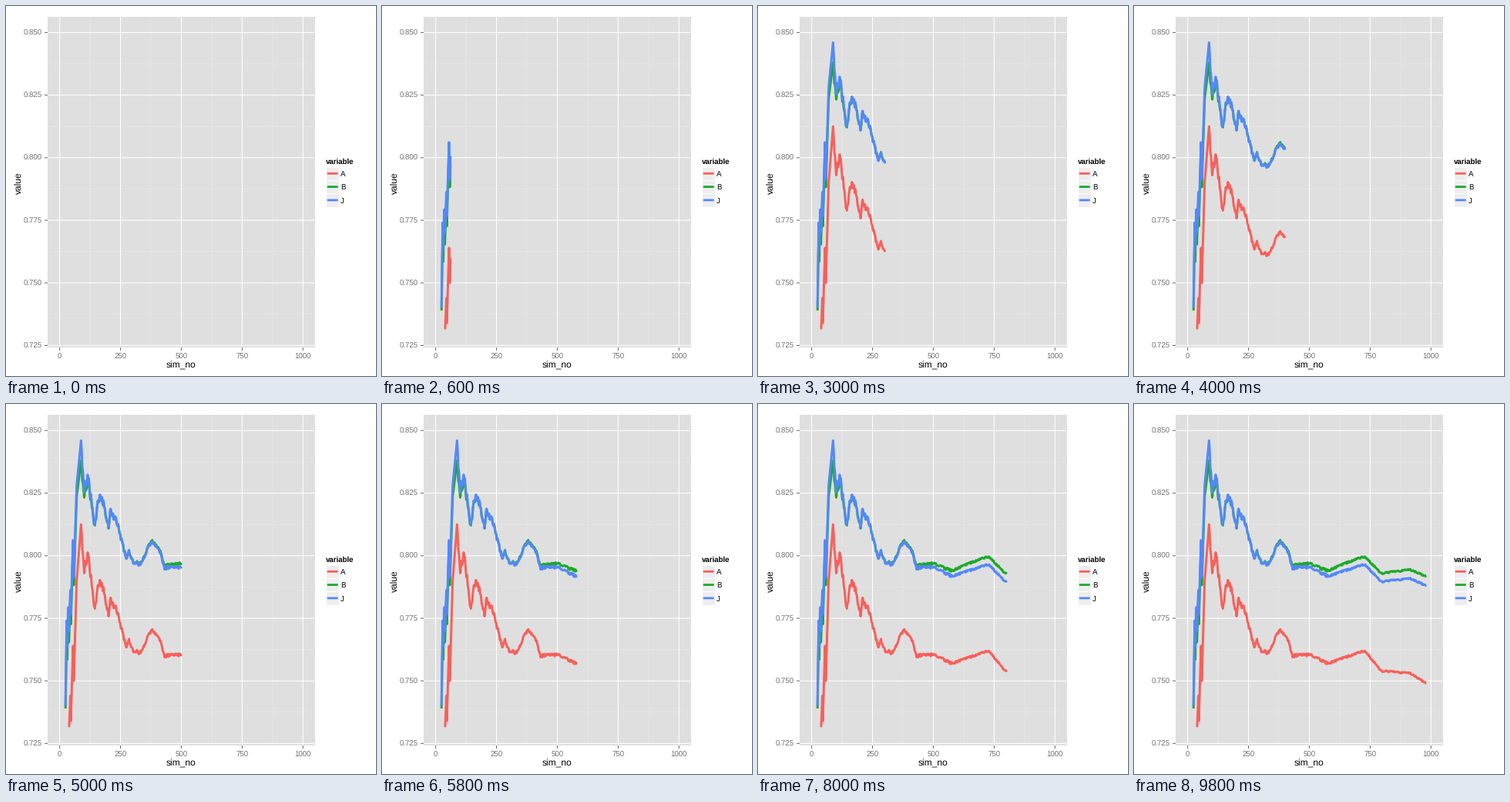
Recreate the animation shown at these times as a matplotlib script. Size 480 px wide and 480 px high, loop 10000 ms.

```python
import numpy as np
import matplotlib.pyplot as plt
from matplotlib.animation import FuncAnimation
from matplotlib.patches import Rectangle

SIZE, DPI = 480, 72
FRAMES, INTERVAL, STEP = 50, 200, 20
LEFT, TOP, RIGHT, BOTTOM = 54, 14, 401, 443

RED, GREEN, BLUE = "#f8605c", "#1caa2c", "#5388fb"
PANEL_GREY, MINOR, KEY, TICK = "#dfdfdf", "#ebebeb", "#eeeeee", "#707070"

plt.rcParams["font.family"] = "Liberation Sans"
plt.rcParams["text.hinting"] = "no_hinting"

# Key points as (sim_no, thousandths): main turns of A, lead of J over A, of B over J
TURNS = [
    (24, 702), (29, 735), (31, 724), (35, 739), (38, 729), (44, 744),
    (46, 734), (55, 764), (58, 750), (70, 790), (88, 812.5), (101, 793),
    (115, 801), (145, 778), (157, 789), (176, 788), (201, 776), (209, 782),
    (236, 778), (274, 763.5), (285, 766.5), (306, 761.5), (335, 761.5),
    (376, 770.5), (410, 767), (430, 760), (500, 760.5), (575, 757),
    (728, 762), (795, 754), (915, 753), (981, 749),
]
J_LEAD = [(24, 38), (50, 43.5), (88, 33.5), (115, 31), (145, 33.5),
          (210, 35.5), (730, 34.5), (981, 39)]
B_LEAD = [(24, -1), (31, -5), (61, -3), (88, -8), (101, -2), (145, -0.3),
          (400, 0.5), (660, 3), (981, 3.7)]


def curve(points, n):
    xs, ys = zip(*points)
    return np.interp(n, xs, ys) / 1000


def px(n):
    return 69.6 + 0.3157 * np.asarray(n)


def py(v):
    return 34.4 + (0.85 - np.asarray(v)) * 3248


# The jitter of a running mean shrinks as 1 / n
sims = np.arange(24, 982)
rng = np.random.default_rng(4)
knots = np.arange(24, 990, 3)
jitter = np.interp(sims, knots, rng.uniform(-1, 1, knots.size))
jitter *= np.where(sims > 90, 0.3 / sims, 0)

a = curve(TURNS, sims) + jitter
j = a + curve(J_LEAD, sims)
b = j + curve(B_LEAD, sims)

fig = plt.figure(figsize=(SIZE / DPI, SIZE / DPI), dpi=DPI, facecolor="white")
ax = fig.add_axes([0, 0, 1, 1])
ax.set_xlim(0, SIZE)
ax.set_ylim(SIZE, 0)
ax.axis("off")


def box(x, y, w, h, color, edge="none"):
    ax.add_patch(Rectangle((x, y), w, h, facecolor=color, edgecolor=edge, lw=1))


def rule(xs, ys, color, width=1.07):
    ax.plot(xs, ys, color=color, lw=width, solid_capstyle="butt", snap=False)


def label(x, y, text, size=9.6, color="black", **kw):
    ax.text(x, y, text, fontsize=size, color=color, va="baseline", **kw)


box(LEFT, TOP, RIGHT - LEFT, BOTTOM - TOP, PANEL_GREY)

for n in range(125, 1000, 250):
    rule([px(n)] * 2, [TOP, BOTTOM], MINOR, 0.55)
for v in np.arange(0.7375, 0.85, 0.025):
    rule([LEFT, RIGHT], [py(v)] * 2, MINOR, 0.55)

for n in range(0, 1001, 250):
    x = px(n)
    rule([x, x], [TOP, BOTTOM], "white")
    rule([x, x], [BOTTOM, BOTTOM + 4], TICK)
    label(x, 458, str(n), color=TICK, ha="center")
for i in range(6):
    v = 0.725 + 0.025 * i
    y = py(v)
    rule([LEFT, RIGHT], [y, y], "white")
    rule([LEFT - 4, LEFT], [y, y], TICK)
    label(47, y + 3.5, f"{v:.3f}", color=TICK, ha="right")

label(227.5, 470, "sim_no", 12, ha="center")
label(20, 229.5, "value", 12, ha="center", rotation=90, rotation_mode="anchor")

label(415, 205.3, "variable", weight="bold")
for i, (name, color) in enumerate(zip("ABJ", (RED, GREEN, BLUE))):
    y = 208.7 + 17.28 * i
    box(415, y, 17.28, 17.28, KEY, "white")
    rule([416.7, 430.6], [y + 8.6] * 2, color, 2.8)
    label(434, y + 12.5, name)

series = []
for values, color, first in ((a, RED, 39), (b, GREEN, 24), (j, BLUE, 24)):
    line, = ax.plot([], [], color=color, lw=3, solid_capstyle="butt",
                    solid_joinstyle="round")
    series.append((line, values, first))


def draw(frame):
    last = STEP * frame + 1
    for line, values, first in series:
        seen = (sims >= first) & (sims <= last)
        line.set_data(px(sims[seen]), py(values[seen]))
    return [line for line, _, _ in series]


anim = FuncAnimation(fig, draw, frames=FRAMES, interval=INTERVAL,
                     repeat=True, repeat_delay=0)
plt.show()
```
